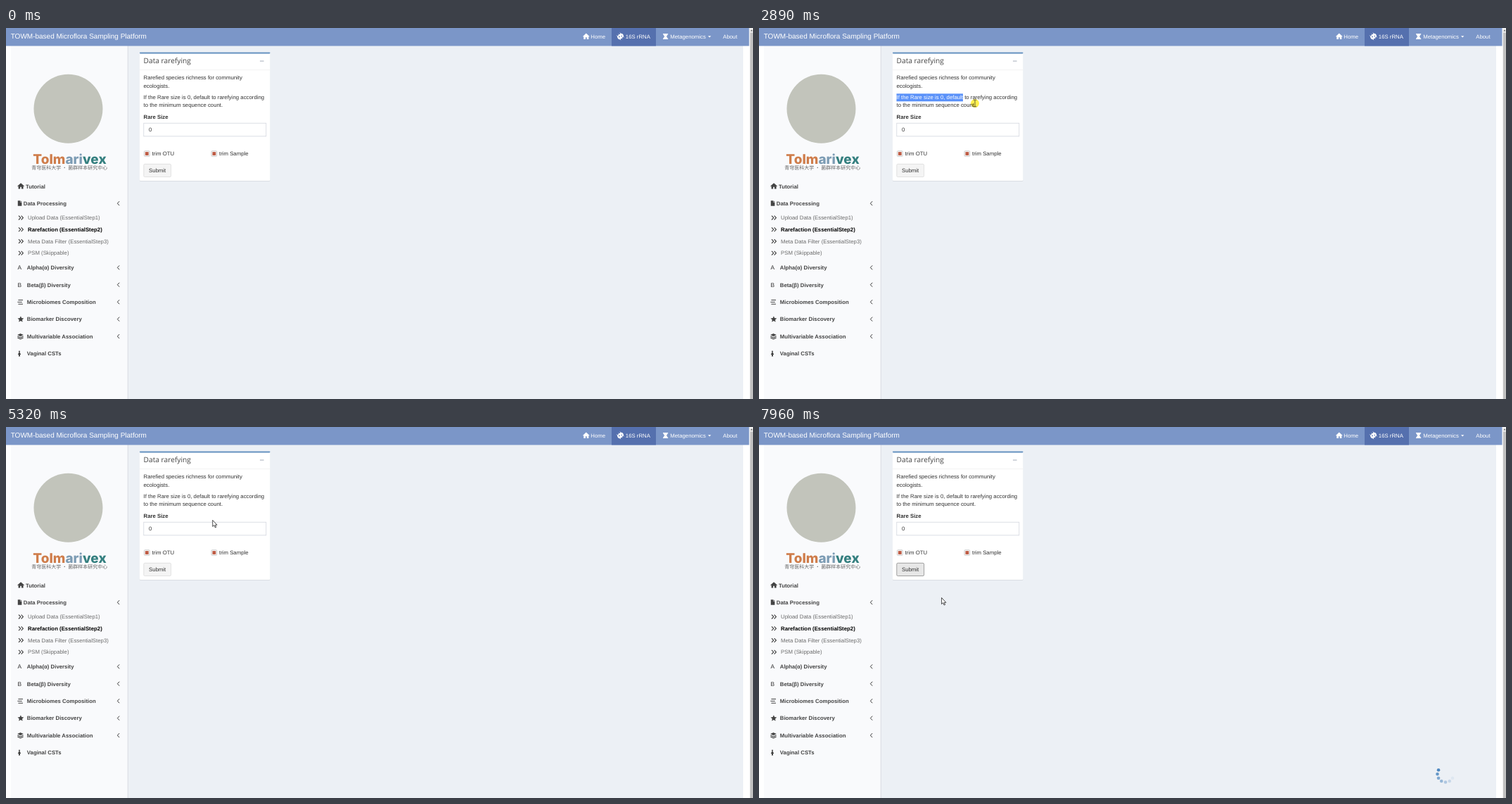
Recreate the animation shown at these times as an HTML page. Size 1062 by 527 pixels, loop 8 s.

```html
<!DOCTYPE html>
<html lang="en">
<head>
<meta charset="utf-8">
<title>Data rarefying</title>
<style>
html, body { margin: 0; width: 100%; height: 100%; overflow: hidden; background: #fff; }
svg { display: block; width: 1062px; height: 527px; }
text { font: 7.8px "Liberation Sans", Arial, sans-serif; fill: #333; text-rendering: geometricPrecision; }
.nav text { fill: #fff; }
.nav .brand { font-size: 10px; }
.b { font-weight: bold; }
.side .b { fill: #444; }
.side .sub { fill: #6b6b6b; }
.side .on { fill: #000; }
.side .letter { font-size: 8.4px; }
.head { font: 10.2px "Open Sans", "Noto Sans", sans-serif; fill: #444; }
.word { font: 800 19px Inter, sans-serif; }
.cjk { font: 7px "Noto Sans CJK SC", "Noto Sans CJK", sans-serif; fill: #666; }
.line { fill: none; stroke: #3c3c3c; }
.white text { fill: #fff; }
#press { mix-blend-mode: multiply; }
</style>
</head>
<body>
<svg viewBox="0 0 1062 527">
  <defs>
    <clipPath id="clip"><rect id="c1" y="93.2" x="195.5" height="11.1"/><rect id="c2" y="104.3" x="195.5" height="11.1"/></clipPath>
    <path id="house" d="M0 4.3L4.8 0L9.6 4.3L9 5L8.3 4.4V8.4H5.7V5.6H3.9V8.4H1.3V4.4L.6 5Z"/>
    <path id="left" class="line" d="M3.2 0L.4 3L3.2 6" stroke-width="1"/>
    <path id="right2" class="line" d="M0 0L2.8 2.9L0 5.8M3.6 0L6.4 2.9L3.6 5.8" stroke-width="1.1"/>
    <g id="check">
      <rect x=".5" y=".5" width="7.6" height="7.6" rx="1" fill="#fff" stroke="#bbb" stroke-width=".8"/>
      <rect x="1.9" y="1.9" width="4.8" height="4.8" fill="#bd5a43"/>
    </g>
  </defs>

  <rect width="1062" height="527" fill="#fff"/>
  <rect x="7" y="25" width="166" height="502" fill="#f9fafc"/>
  <rect x="173" y="25" width="875" height="502" fill="#ecf0f5"/>
  <rect x="172.8" y="25" width=".8" height="502" fill="#d2d6de"/>

  <g class="nav">
    <rect width="1056.5" height="25.5" fill="#7b96c8"/>
    <rect x="861" width="63" height="25.5" fill="#5570ae"/>
    <g id="navText"></g>
    <g fill="#fff">
      <use href="#house" x="820" y="7.6"/>
      <g transform="rotate(-40 873.5 12)">
        <rect x="869" y="8.9" width="9.2" height="6.2" rx="3.1"/>
        <path d="M870.5 7.6V16.2M873.5 7.6V16.2M876.5 7.6V16.2" stroke="#fff" stroke-width=".8"/>
        <g fill="#5570ae"><circle cx="872" cy="11.3" r=".9"/><circle cx="875.2" cy="12.8" r=".8"/></g>
      </g>
      <path d="M934 8H941.2V9.2H940.4C940.4 10.8 939.4 11.5 938.6 12C939.4 12.5 940.4 13.2 940.4 14.8H941.2V16H934V14.8H934.8C934.8 13.2 935.8 12.5 936.6 12C935.8 11.5 934.8 10.8 934.8 9.2H934Z"/>
      <path d="M998 11.2H1002.4L1000.2 13.5Z"/>
    </g>
  </g>
  <rect x="1057" width="5" height="527" fill="#f1f1f1"/>
  <path d="M1058.4 4.4L1060 2.2L1061.6 4.4Z" fill="#666"/>
  <rect x="1058" y="6.5" width="4" height="520.5" fill="#c1c1c1"/>

  <g class="side">
    <circle cx="88.5" cy="114.8" r="49" fill="#c2c4bb"/>
    <text class="word" x="90.5" y="192.8" text-anchor="middle"><tspan fill="#cf7d4b">Tolm</tspan><tspan fill="#7c9cb4">ari</tspan><tspan fill="#347f7f">vex</tspan></text>
    <text class="cjk" x="90.3" y="200.6" text-anchor="middle">青穹医科大学 · 菌群样本研究中心</text>
    <g id="menu"></g>
    <g fill="#444">
      <use href="#house" x="16.3" y="220.2"/>
      <path d="M16.8 245.2H20.2V247.5H22.4V252.8H16.8ZM20.7 245.2L22.4 247H20.7Z"/>
      <path class="line" d="M17.4 386.4H24M16.4 389.3H22.8M17.4 392.2H24" stroke-width="1"/>
      <path id="star"/>
      <path d="M20.5 434L24.9 436L20.5 438L16.1 436Z"/>
      <path class="line" d="M16.4 438L20.5 439.9L24.6 438M16.4 440.1L20.5 442L24.6 440.1" stroke-width="1.1"/>
      <circle cx="19" cy="459.7" r="1.1"/>
      <path d="M18.2 461.1H19.8L21.2 464.1H20V466.4H18V464.1H16.8Z"/>
    </g>
  </g>

  <rect x="190" y="36" width="185.5" height="182" rx="1.5" fill="#dadee3"/>
  <rect x="190" y="34.6" width="185.5" height="182.4" rx="1.5" fill="#fff"/>
  <rect x="190" y="34.6" width="185.5" height="1.8" rx=".8" fill="#6390c0"/>
  <rect x="190" y="59.3" width="185.5" height=".7" fill="#f0f0f0"/>
  <rect x="361" y="46.5" width="5.6" height="1" fill="#a3abb9"/>
  <text class="head" x="195.6" y="50.2">Data rarefying</text>
  <rect id="field" x="195.8" y="135.2" width="174" height="18.6" fill="#fff" stroke="#d2d6de" stroke-width=".8"/>
  <use href="#check" x="196" y="174.2"/>
  <use href="#check" x="291.6" y="174.2"/>
  <rect id="btn" x="195.8" y="193.3" width="38.8" height="18.2" rx="1.6" stroke-width=".8"/>
  <g id="copy"></g>
  <text x="203" y="147.4">0</text>
  <text x="207.6" y="181">trim OTU</text>
  <text x="303" y="181">trim Sample</text>
  <text x="203" y="204.7">Submit</text>

  <g clip-path="url(#clip)" class="white">
    <rect x="195" y="93" width="175" height="23" fill="#5b92f9"/>
    <g id="selText"></g>
  </g>

  <g id="spin"></g>

  <circle id="press" r="6" fill="#fff04f"/>
  <g id="pointer" stroke-linejoin="round" stroke-width=".75">
    <path id="arrow" d="M0 0V9L2.1 7.2L3.6 10.5L5 9.9L3.6 6.8H6.3Z" fill="#fff" stroke="#111"/>
    <path id="beam" d="M-2.3 -4.8H-.6L0 -4.3L.6 -4.8H2.3M0 -4.3V4.3M-2.3 4.8H-.6L0 4.3L.6 4.8H2.3" fill="none" stroke="#333"/>
    <path id="hand" d="M-1 .6Q0 -.8 1 .6V4.3Q2 3.5 2.7 4.6Q3.7 3.9 4.3 5Q5.4 4.6 5.5 6V8.4Q5.3 9.8 4.4 11.4H-.6Q-1.6 9.5 -3.2 7.2Q-3.4 5.7 -1 7.2Z" fill="#fff" stroke="#111"/>
  </g>
</svg>
<script>
const NS = 'http://www.w3.org/2000/svg';
const $ = id => document.getElementById(id);
const clamp = (v, lo, hi) => Math.min(hi, Math.max(lo, v));

function add(parent, tag, attrs, str) {
  const el = document.createElementNS(NS, tag);
  for (const k in attrs) el.setAttribute(k, attrs[k]);
  if (str) el.textContent = str;
  return $(parent).appendChild(el);
}
const label = (parent, x, y, str, cls = '') => add(parent, 'text', { x, y, class: cls }, str);
const set = (id, attrs) => { for (const k in attrs) $(id).setAttribute(k, attrs[k]); };
const show = (id, on) => $(id).setAttribute('visibility', on ? 'visible' : 'hidden');

label('navText', 6.7, 15.1, 'TOWM-based Microflora Sampling Platform', 'brand');
label('navText', 831.3, 14.8, 'Home');
label('navText', 880.8, 14.8, '16S rRNA');
label('navText', 944.2, 14.8, 'Metagenomics');
label('navText', 1019.2, 14.8, 'About');

const ROW = 24.43;
const fold = y => add('menu', 'use', { href: '#left', x: 158, y: y - 5.8 });
label('menu', 28, 227.5, 'Tutorial', 'b');
label('menu', 24.8, 227.5 + ROW, 'Data Processing', 'b');
fold(227.5 + ROW);
['Upload Data (EssentialStep1)', 'Rarefaction (EssentialStep2)', 'Meta Data Filter (EssentialStep3)', 'PSM (Skippable)']
  .forEach((s, i) => {
    const y = 272.3 + i * 16.7;
    label('menu', 31, y, s, i === 1 ? 'b on' : 'sub');
    add('menu', 'use', { href: '#right2', x: 18, y: y - 5.6 });
  });
['Alpha(α) Diversity', 'Beta(β) Diversity', 'Microbiomes Composition', 'Biomarker Discovery', 'Multivariable Association', 'Vaginal CSTs']
  .forEach((s, i) => {
    const y = 343.1 + i * ROW;
    label('menu', 29.8, y, s, 'b');
    if (i < 2) label('menu', 16.4, y, 'AB'[i], 'letter');
    if (i < 5) fold(y);
  });

let star = '';
for (let i = 0; i < 10; i++) {
  const a = i * Math.PI / 5, r = i % 2 ? 2.2 : 4.6;
  star += (i ? 'L' : 'M') + (20.9 + r * Math.sin(a)) + ' ' + (413.8 - r * Math.cos(a));
}
set('star', { d: star + 'Z' });

const LEFT = 195.5, LEAD = 11.1;
const lines = ['If the Rare size is 0, default to rarefying according', 'to the minimum sequence count.'];
label('copy', LEFT, 73.4, 'Rarefied species richness for community');
label('copy', LEFT, 73.4 + LEAD, 'ecologists.');
lines.forEach((s, i) => label('copy', LEFT, 101.2 + i * LEAD, s));
const selected = lines.map((s, i) => label('selText', LEFT, 101.2 + i * LEAD, s));
label('copy', LEFT, 129.1, 'Rare Size', 'b');

const dots = Array.from({ length: 12 }, (_, i) => {
  const a = i * Math.PI / 6;
  return add('spin', 'circle', { cx: 976 + 11.5 * Math.cos(a), cy: 493 + 11.5 * Math.sin(a), r: 2.3, fill: '#4682bd' });
});

const STEP = 66.7;   // screen refresh while something moves
const PRESS = 1750, RELEASE = 5050, CLEAR = 5190, CLICK = 7410;

// Pointer moves: start, end, x, y, easing power, bow
const moves = [
  [200, 330, 507, 283],
  [530, 1260, 193.7, 100.3, .7],
  [1610, 1610, 194.6, 101],
  [PRESS, 2500, 266, 107, 1.3],
  [2560, 2890, 307, 107],
  [2960, 3360, 351, 104.5, 1, 5],
  [3430, 3560, 355, 102],
  [3630, 4170, 370, 109.5],
  [4240, 4380, 323, 110.7],
  [4450, 4650, 289.5, 110],
  [4790, RELEASE, 316.5, 111],
  [CLEAR, 5990, 218, 203.5],
  [6060, 6200, 219.8, 204.6],
  [CLICK, 7960, 259.6, 242.5, 2]
];

function refresh(t) {
  const m = moves.filter(m => m[0] <= t).pop();
  if (!m) return 0;
  const [a, b] = m, step = (b - a) / Math.max(1, Math.round((b - a) / STEP));
  return t >= b ? b : a + Math.floor((t - a) / step + .1) * step;
}

function pos(t) {
  let x = 1155, y = 626;
  for (const [a, b, tx, ty, power = 1, bow = 0] of moves) {
    if (t < a) break;
    const p = clamp((t - a + STEP) / (b - a + STEP), 0, 1), k = p ** power;
    x += (tx - x) * k;
    y += (ty - y) * k + bow * Math.sin(Math.PI * p);
  }
  return [x, y];
}

const boxOf = el => el.getBBox();
const copyBoxes = [...$('copy').children, $('field')].map(boxOf);
const btnBox = boxOf($('btn'));
const within = (x, y, b, pad = 0) =>
  x >= b.x && x <= b.x + b.width && y >= b.y - pad && y <= b.y + b.height + pad;

// Right edge of the characters before x
function edge(text, x) {
  let end = LEFT;
  for (let i = 0; i < text.getNumberOfChars(); i++) {
    const a = text.getStartPositionOfChar(i).x, b = text.getEndPositionOfChar(i).x;
    if ((a + b) / 2 > x) break;
    end = b;
  }
  return end;
}

// The selection trails the pointer a little
function select(t) {
  let w1 = 0, w2 = 0;
  if (t >= PRESS && t < CLEAR) {
    const [x, y] = pos(Math.max(PRESS, t - 160));
    const second = y > 108;
    w1 = second ? 173.5 : edge(selected[0], x) - LEFT;
    w2 = second ? edge(selected[1], x) - LEFT : 0;
  }
  set('c1', { width: w1 });
  set('c2', { width: w2 });
}

function draw(time) {
  const t = refresh(time);
  const [x, y] = pos(t);
  const onBtn = within(x, y, btnBox);
  const kind = onBtn ? 'hand' : copyBoxes.some(b => within(x, y, b, 1.2)) ? 'beam' : 'arrow';
  for (const k of ['hand', 'beam', 'arrow']) $(k).style.display = k === kind ? '' : 'none';
  show('pointer', t >= moves[0][0]);
  set('pointer', { transform: `translate(${x} ${y})` });

  show('press', (t >= PRESS && t < RELEASE) || (t >= CLICK && t < CLICK + 140));
  set('press', { cx: x, cy: y });
  select(t);

  const used = t >= CLICK;
  set('btn', {
    fill: used || onBtn ? '#e7e7e7' : '#f4f4f4',
    stroke: used ? '#8c8c8c' : onBtn ? '#adadad' : '#ddd'
  });

  show('spin', t >= CLICK + 190);
  const head = 7 + (t - 7960) / 100;
  dots.forEach((d, i) => {
    const age = (((head - i) % 12) + 12) % 12;
    d.setAttribute('opacity', Math.max(0, .95 - age * .145));
  });
}

const start = performance.now();
function tick(now) {
  draw(Math.max(0, now - start) % 8000);
  requestAnimationFrame(tick);
}
draw(0);
requestAnimationFrame(tick);
</script>
</body>
</html>
```
